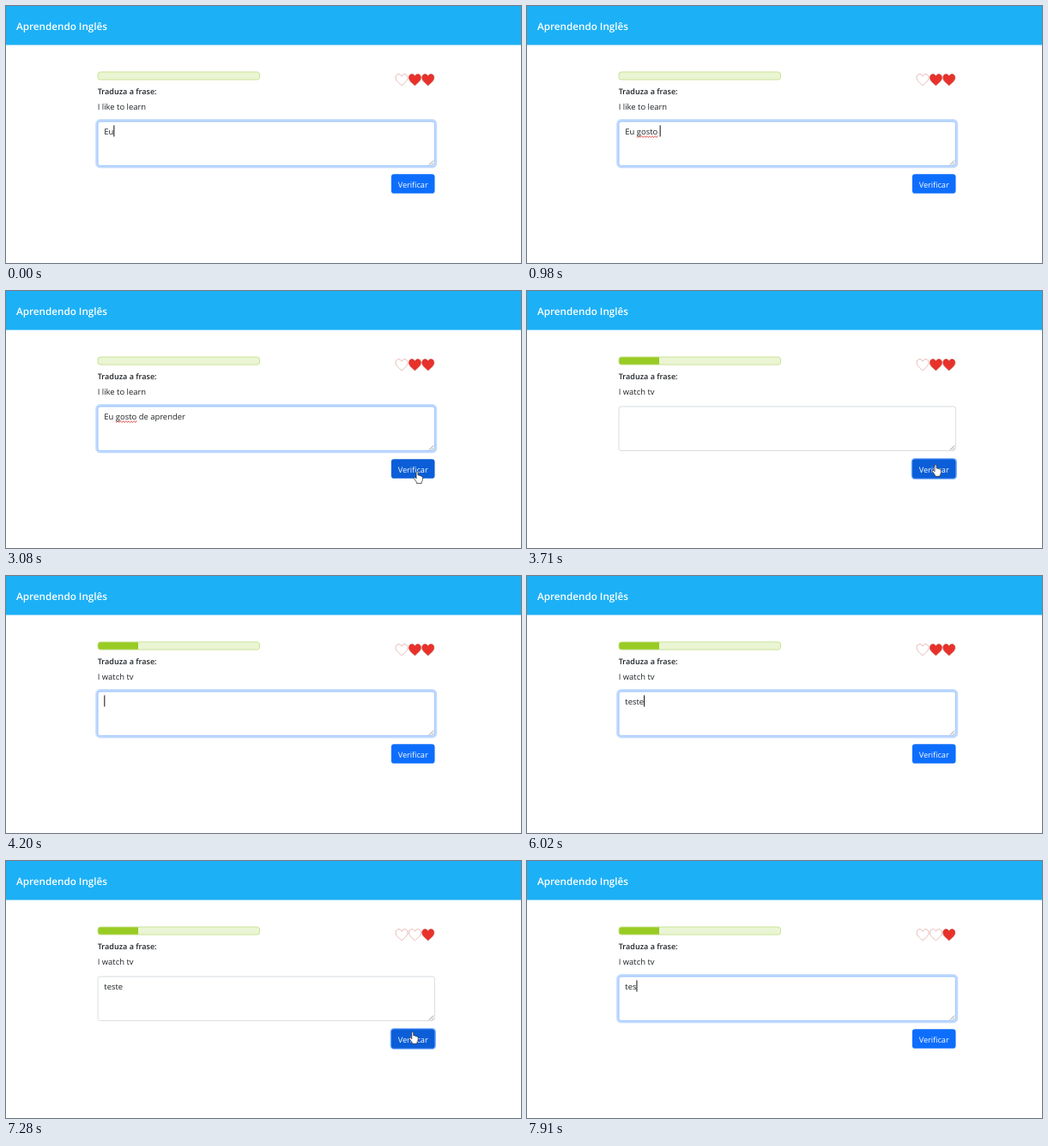
Animation of 600x300 px, one loop 8000 ms. Source, as an HTML page:

```html
<!DOCTYPE html>
<html lang="pt">
<head>
<meta charset="utf-8">
<style>
  html, body { margin: 0; width: 100%; height: 100%; overflow: hidden; background: #fff; }
  svg { display: block; width: 600px; height: 300px; }
  text { font: 9.45px "Open Sans", "Noto Sans", sans-serif; fill: #212529; white-space: pre; text-rendering: geometricPrecision; }
  .title { font-size: 11.7px; font-weight: 600; fill: #fff; }
  .label { font-size: 9.05px; font-weight: 600; }
  .btn { font-size: 9.15px; fill: #fff; text-anchor: middle; }
</style>
</head>
<body>
<svg viewBox="0 0 600 300">
  <defs>
    <path id="heart" d="M0 6.6C-3 3.8-7 1.2-7-2.6C-7-7.2-1.6-8 0-4.1C1.6-8 7-7.2 7-2.6C7 1.2 3 3.8 0 6.6Z"/>
  </defs>
  <rect width="600" height="45.5" fill="#1cb0f6"/>
  <text class="title" x="12" y="28">Aprendendo Inglês</text>

  <rect x="107" y="77" width="188.5" height="9" rx="3" fill="#eaf5d4"/>
  <path id="bar" d="M154 77H110a3 3 0 0 0-3 3v3a3 3 0 0 0 3 3h44z" fill="#99cb25"/>
  <rect x="107" y="77" width="188.5" height="9" rx="3" fill="none" stroke="#c6e08c" stroke-width=".9"/>

  <g id="hearts" stroke-width=".7">
    <use href="#heart" x="461" y="86.2"/>
    <use href="#heart" x="476.4" y="86.2"/>
    <use href="#heart" x="491.7" y="86.2"/>
  </g>

  <text class="label" x="106.7" y="102.5">Traduza a frase:</text>
  <text id="phrase" x="106.7" y="121"></text>

  <rect id="ring" x="105.6" y="133.5" width="395.2" height="54.3" rx="4" fill="none" stroke="#c2dbfe" stroke-width="2.8"/>
  <rect id="box" x="107" y="134.9" width="392.4" height="51.5" rx="2.6" fill="#fff" stroke-width=".8"/>
  <path d="M493 185.5l5-5M496 185.5l2-2" stroke="#666" stroke-width=".7"/>
  <path id="wave" fill="none" stroke="#e0342c" stroke-width=".8"/>
  <text id="answer" x="114.3" y="150"></text>
  <rect id="caret" y="139.3" width="1" height="13.2" fill="#111"/>

  <rect id="btnRing" x="447.6" y="195" width="53.4" height="25" rx="4.5" fill="#86b6fe"/>
  <rect id="btn" x="448.8" y="196.2" width="50.7" height="22.6" rx="3.4"/>
  <text class="btn" x="474.2" y="211.5">Verificar</text>

  <g id="cursor" fill="#fff" stroke="#222" stroke-width=".7" stroke-linejoin="round">
    <path id="hand" d="M-1 .8Q0-.5 1 .8V4.6Q2.3 3.9 2.9 5.1Q4.2 4.6 4.7 5.8Q6.2 5.3 6.4 7V9.4Q6.2 11.3 5.2 12.3V14H-.6V12.6Q-2.2 10.7-3.7 8.2Q-3.8 6.4-2.2 7L-1 8.4Z"/>
    <path id="arrow" d="M0 0V10.6L2.5 8.3L4.1 12L5.7 11.3L4.1 7.7H7.5Z"/>
  </g>
</svg>
<script>
const LOOP = 8000, STEP = 70, BLINK = 530;
const $ = id => document.getElementById(id);
const clamp = v => Math.max(0, Math.min(1, v));
// rises from a and falls from b, 150 ms each
const pulse = (t, a, b) => clamp((t - a) / 150) - clamp((t - b) / 150);
const show = (id, on) => $(id).setAttribute('visibility', on ? 'visible' : 'hidden');
const attr = (id, name, v) => $(id).setAttribute(name, v);
const mix = (a, b, k) => `rgb(${a.map((v, i) => Math.round(v + (b[i] - v) * k))})`;

// each entry: time, content of the answer box from then on
const edits = [[0, 'Eu']];
function type(word, times) {
  times.forEach(t => edits.push([t, word.slice(0, word.length - times.length + times.indexOf(t) + 1)]));
}
type('Eu gosto de aprender', [280, 350, 490, 560, 700, 840, 980, 1050, 1120, 1260, 1330, 1470, 1540, 1610, 1680, 1890, 1960, 2100]);
edits.push([3220, ''], [4090, '']);
type('teste', [5600, 5670, 5810, 5950, 6020]);
edits.push([7560, 'teste'], [7770, 'test'], [7910, 'tes']);

const moves = [
  [[2800, 484, 190], [3010, 480, 209], [3080, 479, 210.5], [3640, 479, 210.5], [3850, 470, 186]],
  [[6440, 518, 192], [6650, 484, 213], [6860, 477.5, 212.5], [7210, 477.5, 212.5], [7350, 470, 186]]
];

function pointer(t) {
  for (const path of moves)
    for (let i = 1; i < path.length; i++) {
      const [a, ax, ay] = path[i - 1], [b, bx, by] = path[i];
      if (t >= a && t < b) {
        const k = (t - a) / (b - a);
        return [ax + (bx - ax) * k, ay + (by - ay) * k];
      }
    }
  return null;
}

let wave = 'M128 152.6';
for (let x = 128.5; x <= 152.5; x += .5) wave += `L${x} ${(152.6 + .9 * Math.sin((x - 128) * 2)).toFixed(2)}`;
attr('wave', 'd', wave);

function draw(t) {
  const [since, text] = edits.filter(e => e[0] <= t).pop();
  const second = t >= 3220;
  $('phrase').textContent = second ? 'I watch tv' : 'I like to learn';
  $('answer').textContent = text;
  show('bar', second);
  show('wave', t >= 980 && !second);

  [...$('hearts').children].forEach((h, i) => {
    const full = i >= (t >= 7000 ? 2 : 1);
    h.setAttribute('fill', full ? '#e8312a' : '#fff');
    h.setAttribute('stroke', full ? '#c9423a' : '#dd9d97');
  });

  const blur = pulse(t, 3150, 4050) + pulse(t, 6930, 7540);
  attr('ring', 'opacity', 1 - blur);
  attr('box', 'stroke', mix([134, 183, 254], [206, 212, 218], blur));
  attr('btnRing', 'opacity', blur);
  show('caret', blur < .5 && (t - since) % (2 * BLINK) < BLINK);
  attr('caret', 'x', 114.3 + (text ? $('answer').getComputedTextLength() : 0));

  const hover = pulse(t, 2850, 3780) + pulse(t, 6580, 7280);
  attr('btn', 'fill', mix([13, 110, 253], [11, 94, 215], hover));

  const p = pointer(t);
  show('cursor', p);
  if (p) attr('cursor', 'transform', `translate(${p})`);
  const over = p && p[0] < 499.5 && p[1] > 196;
  $('hand').style.display = over ? '' : 'none';
  $('arrow').style.display = over ? 'none' : '';
}

function tick(now) {
  const t = now % LOOP;
  draw(Math.floor(t / STEP + 1e-6) * STEP);
  requestAnimationFrame(tick);
}
draw(0);
requestAnimationFrame(tick);
</script>
</body>
</html>
```
